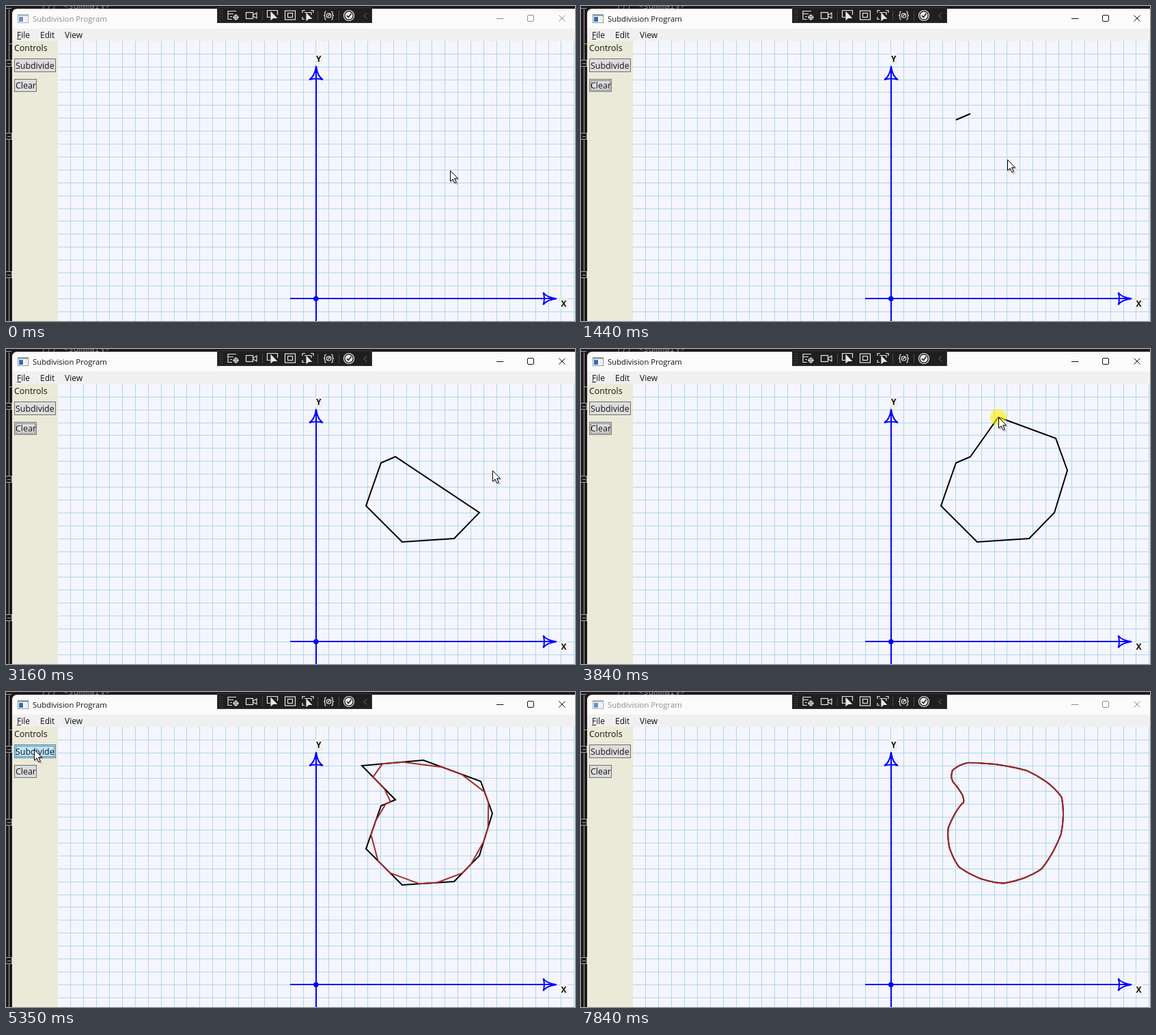
An HTML page that plays this animation: 833 px wide and 462 px high, repeating every 8440 ms.

```html
<!DOCTYPE html>
<html lang="en">
<head>
<meta charset="utf-8">
<title>Subdivision Program</title>
<style>
html, body { margin: 0; width: 100%; height: 100%; overflow: hidden; background: #1f1a1d; }
svg { display: block; width: 833px; height: 462px; }
text { font-family: "Open Sans", "Noto Sans", sans-serif; font-size: 12px; fill: #111; }
.ui { font-size: 12.4px; }
.title { font-size: 11.3px; }
.label { font-weight: 700; }
.code { font-family: "Noto Sans Mono", monospace; font-size: 13px; fill: #8a8a8a; }
.line { fill: none; stroke-width: 2; }
.btn { fill: #ddd; stroke: #707070; }
.btn.hover { fill: #bee6fd; stroke: #3c7fb1; }
.btn.down { fill: #c4e5f6; stroke: #2c628b; }
.focus { fill: none; stroke: #222; stroke-dasharray: 1 1; }
.ico { fill: none; stroke: #e8e8e8; stroke-width: 1.2; }
</style>
</head>
<body>
<svg viewBox="0 0 833 462" xmlns="http://www.w3.org/2000/svg">
  <rect width="833" height="462" fill="#1f1a1d"/>
  <text class="code" x="52" y="4">/// &lt;summary&gt;</text>
  <g id="gutter" fill="#1f1a1d" stroke="#a5a5a5">
    <path d="M4.5 5V462M4.5 55.5H9M0 3.5H8"/>
  </g>

  <path d="M9 462V12Q9 4 17 4H833V462Z" fill="#fbfbfb"/>
  <rect x="9" y="33" width="824" height="18" fill="#f0f0f0"/>
  <rect x="9" y="51" width="67" height="411" fill="#ebe9d8"/>
  <rect x="76" y="51" width="757" height="411" fill="#f5f5fe"/>

  <g id="icon">
    <rect x="17.5" y="12.5" width="15" height="12" fill="#fff" stroke="#8c949c"/>
    <path d="M18 14H32" stroke="#9aa7b5" stroke-width="2"/>
    <rect x="19" y="16" width="6" height="7" fill="#2f6fb5"/>
    <path d="M27 17.5H31M27 20.5H31" stroke="#ccd3da"/>
  </g>
  <text id="title" class="title" x="39" y="23">Subdivision Program</text>
  <g id="winBtns" fill="none" stroke="#111">
    <path d="M718 18.5H728.5M809.5 13.5L818.5 22.5M818.5 13.5L809.5 22.5"/>
    <rect x="763.5" y="13.5" width="9" height="9" rx="1.5"/>
  </g>
  <text x="16" y="47">File</text><path d="M16 48.5H22" stroke="#111"/>
  <text x="50" y="47">Edit</text>
  <text x="86" y="47">View</text>
  <text class="ui" x="12" y="66">Controls</text>
  <rect id="subBtn" class="btn" x="12.5" y="77.5" width="60" height="19"/>
  <text class="ui" x="14" y="92">Subdivide</text>
  <rect id="subFocus" class="focus" x="14.5" y="79.5" width="56" height="15"/>
  <rect class="btn" x="12.5" y="107.5" width="32" height="18"/>
  <text class="ui" x="14" y="121">Clear</text>
  <rect id="clearFocus" class="focus" x="14.5" y="109.5" width="28" height="14"/>

  <path id="grid" stroke="#add8e6" fill="none"/>
  <g class="line" stroke="#00f">
    <path d="M454 88V462M416 429H806"/>
    <path id="arrowY" d="M0 0Q-2 15 -10 19.5Q0 16.5 10 19.5Q2 15 0 0Z" transform="translate(454 88.5)"/>
    <path d="M0 0Q-2 15 -9 19.5Q0 16.5 9 19.5Q2 15 0 0Z" transform="translate(806 429.3) rotate(90)"/>
  </g>
  <circle cx="453.8" cy="429.3" r="3.8" fill="#00f"/>
  <rect x="453" y="70" width="10" height="15" fill="#f0efe8"/>
  <text class="label" x="454" y="82">Y</text>
  <rect x="812" y="429" width="10" height="15" fill="#f0efe8"/>
  <text class="label" x="812.5" y="441">X</text>

  <path id="base" class="line" stroke="#000"/>
  <path id="curve" class="line" stroke="#a52a2a"/>

  <rect x="309.5" y="2.5" width="226" height="22" fill="#1f1f1f" stroke="#353535"/>
  <path d="M313.5 6V22M316.5 6V22" stroke="#666" stroke-dasharray="1 2"/>
  <path d="M375.5 7V21M456.5 7V21M487.5 7V21" stroke="#4a4a4a"/>
  <g class="ico">
    <path d="M325 7.5H337M325 7V20M325 11.5H333M328 15.5H331M325 19.5H331"/>
    <circle cx="336.5" cy="16.5" r="3"/><path d="M336.5 12V21M332 16.5H341"/>
    <rect x="351.5" y="9.5" width="10" height="9"/><path d="M362 13L367 10V18L362 15"/>
    <path d="M387 16.5H382.5V6.5H397.5V13"/>
    <path d="M388 9V20L391 17.5H396Z" fill="#e8e8e8"/>
    <rect x="408.5" y="7" width="15" height="13"/><rect x="412.5" y="10.5" width="7" height="6"/>
    <path d="M434 10V6.5H438M446 6.5H450V10M434 16V19.5H437M437 9.5H447V13"/>
    <path d="M440 11V21L443 18.5H447Z" fill="#e8e8e8"/>
    <path d="M469 8Q466 8 467 11Q467 14 465 14Q467 14 467 17Q466 20 469 20M476 8Q479 8 478 11Q478 14 480 14Q478 14 478 17Q479 20 476 20"/>
    <circle cx="472.5" cy="14" r="3.2"/><path d="M471 15.5L475 11"/>
  </g>
  <circle cx="502" cy="14" r="7.5" fill="none" stroke="#eee" stroke-width="1.2"/>
  <circle cx="502" cy="14" r="5.5" fill="#eee"/>
  <path d="M499 14L501.3 16.5L505.5 11" fill="none" stroke="#1f1f1f" stroke-width="1.6"/>
  <path d="M528 10.5L524 14.5L528 18.5" fill="none" stroke="#777"/>

  <g id="cursor">
    <circle id="halo" r="12" fill="#fff200" fill-opacity=".6"/>
    <path d="M2 2V19L6 15L9 21.5L12 20L9 14H14Z" fill="#000" opacity=".2"/>
    <path d="M.5 .5V16.3L4.1 12.9L6.7 18.8L9.2 17.7L6.6 11.9H11.6Z" fill="#fff" stroke="#000"/>
  </g>
</svg>
<script>
const $ = id => document.getElementById(id);
const LOOP = 8440, FRAME = 68.6, STEP = 18.898;

// Canvas clicks: time, x, y
const clicks = [
  [470, 570, 158], [870, 549, 167], [1850, 527, 230], [2330, 580, 283], [2530, 656, 278],
  [2810, 693, 240], [3220, 712, 178], [3500, 695, 131], [3770, 611, 100], [3980, 521, 108]
];
// Presses of the Subdivide button: down, result, up
const presses = [[5140, 5280, 5350], [5750, 5880, 5880], [6280, 6350, 6350], [6750, 6950, 7020]];

const travel = [
  [1300, 622, 212], [1370, 629, 222], [1440, 624, 225], [2200, 580, 283], [2400, 612, 285],
  [2469, 656, 279], [3160, 712, 178], [4180, 521, 108], [4450, 400, 137], [5000, 41, 84],
  [7150, 41, 84], [7710, 300, 395], [7770, 320, 480]
];
const route = [
  [0, 650, 241], [330, 570, 158],
  ...clicks.flatMap(([t, x, y]) => t === 2330 ? [[t, x, y]] : [[t, x, y], [t + 70, x, y]]),
  ...travel
].sort((a, b) => a[0] - b[0]);

function cursorAt(t) {
  const i = route.findIndex(k => k[0] > t);
  if (i < 0) return [320, 480];
  const [t0, x0, y0] = route[i - 1], [t1, x1, y1] = route[i];
  const u = (t - t0) / (t1 - t0), e = u * u * (3 - 2 * u);
  return [x0 + (x1 - x0) * e, y0 + (y1 - y0) * e];
}

// Each edge keeps its middle third
const cut = pts => pts.flatMap(([x, y], i) => {
  const [p, q] = pts[(i + 1) % pts.length];
  return [[x + (p - x) / 3, y + (q - y) / 3], [x + (p - x) * 2 / 3, y + (q - y) * 2 / 3]];
});
const levels = [clicks.map(c => c.slice(1))];
for (const _ of presses) levels.push(cut(levels.at(-1)));

const outline = pts => pts.length > 1 ? "M" + pts.map(p => p.map(v => v.toFixed(2))).join("L") + "Z" : "";
const show = (id, on) => $(id).setAttribute("visibility", on ? "visible" : "hidden");

function buildScene() {
  let d = "";
  for (let x = 453.9 - 19 * STEP; x < 833; x += STEP) d += `M${Math.floor(x) + .5} 51V462`;
  for (let y = 429.3 - 19 * STEP; y < 462; y += STEP) d += `M76 ${Math.floor(y) + .5}H833`;
  $("grid").setAttribute("d", d);
  for (const y of [84, 191, 394])
    $("gutter").innerHTML += `<rect x="-.5" y="${y - 4.5}" width="9" height="9"/><path d="M2 ${y + .5}H7"/>`;
}

function draw(t) {
  const active = t >= 470 && t < 7840;
  const [x, y] = cursorAt(Math.floor((t + 10) / FRAME) * FRAME);
  const pressed = presses.some(([a, , c]) => t >= a && t < c);
  const clicking = clicks.some(([a]) => t >= a && t < a + (a === 3980 ? 200 : 120));
  const level = presses.filter(p => t >= p[1]).length;
  const hover = x >= 12 && x <= 73 && y >= 77 && y <= 97;

  $("title").style.fill = active ? "#111" : "#8c8c8c";
  $("winBtns").setAttribute("stroke", active ? "#111" : "#8c8c8c");
  $("icon").setAttribute("opacity", active ? 1 : .75);
  $("subBtn").setAttribute("class", "btn" + (pressed ? " down" : hover ? " hover" : ""));
  show("clearFocus", active && t < presses[0][0]);
  show("subFocus", active && t >= presses[0][0]);

  const placed = levels[0].filter((_, i) => t >= clicks[i][0]);
  $("base").setAttribute("d", outline(level ? levels[level - 1] : placed));
  $("curve").setAttribute("d", level ? outline(levels[level]) : "");
  $("cursor").setAttribute("transform", `translate(${Math.round(x)} ${Math.round(y)})`);
  show("halo", pressed || clicking);
}

buildScene();
const start = performance.now();
(function tick() {
  draw((performance.now() - start) % LOOP);
  requestAnimationFrame(tick);
})();
</script>
</body>
</html>
```
